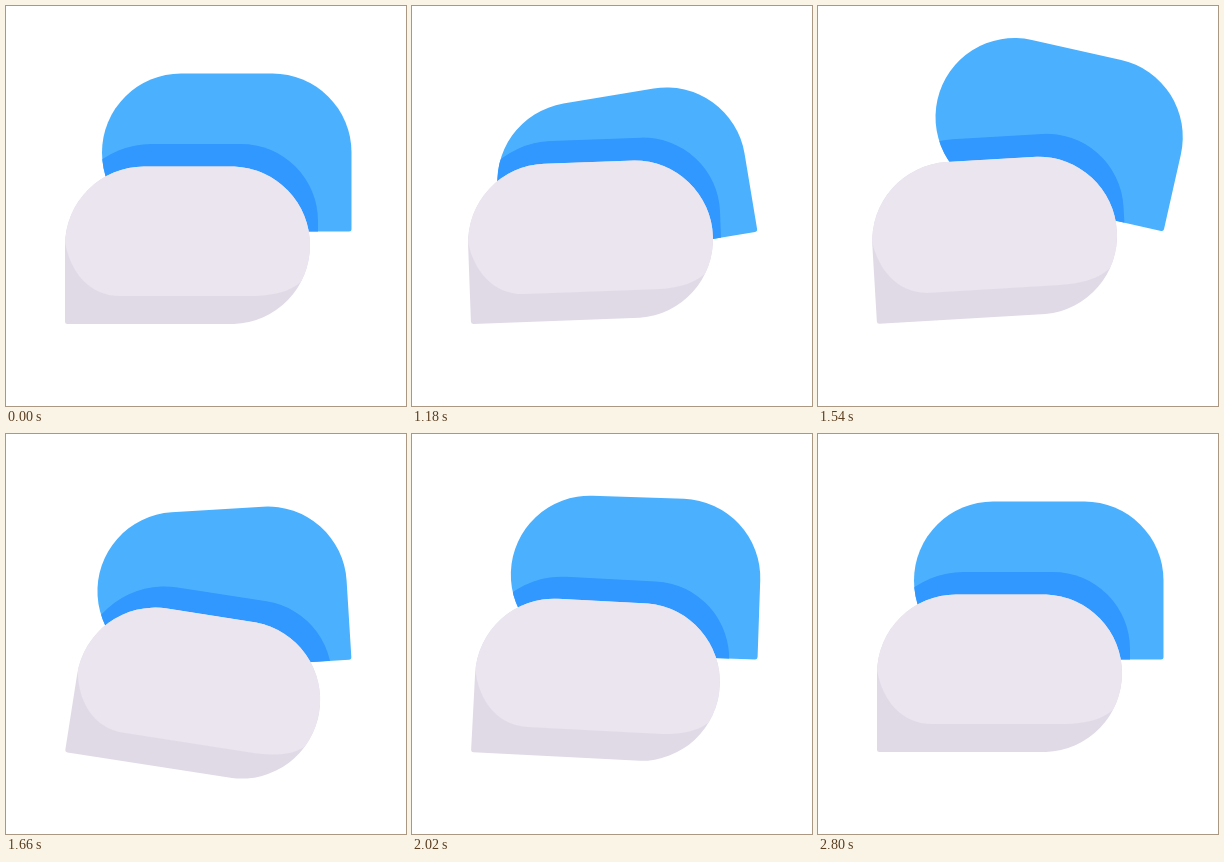
An HTML page that plays this animation: 400 px wide and 400 px high, repeating every 2830 ms.

```html
<!DOCTYPE html>
<html lang="en">
<head>
<meta charset="utf-8">
<title>Chat bubbles</title>
<style>
  html, body { margin: 0; width: 100%; height: 100%; overflow: hidden; background: #fff; }
  svg { display: block; width: 100vw; height: 100vh; }
</style>
</head>
<body>
<svg viewBox="0 0 400 400">
  <defs>
    <path id="backShape" d="M175 67.5H266.5A79 79 0 0 1 345.5 146.5V223Q345.5 225.5 343 225.5H175A79 79 0 0 1 175 67.5Z"/>
    <path id="frontShape" d="M138 160.5H228A78.8 78.8 0 0 1 228 318H61.5Q59 318 59 315.500V239.500A79 79 0 0 1 138 160.5Z"/>
    <clipPath id="backClip"><use href="#backShape"/></clipPath>
    <clipPath id="frontClip"><use href="#frontShape"/></clipPath>
  </defs>
  <g id="back">
    <use href="#backShape" fill="#4bb1fe"/>
    <g clip-path="url(#backClip)">
      <path id="shadow" fill="#3198ff" d="M60 223A85 85 0 0 1 145 138H235A77 77 0 0 1 312 215V300H60Z"/>
    </g>
  </g>
  <g id="front">
    <use href="#frontShape" fill="#e0dae7"/>
    <path clip-path="url(#frontClip)" fill="#ebe5f0" d="M58 228C61 262 81 290 114 290H244C272 290 297 283 304 262L320 240V150H58Z"/>
  </g>
</svg>
<script>
  const LOOP = 2830, START = 1030, STEP = 30;
  const BACK_PIVOT = "345.5 225.5", FRONT_PIVOT = "59 318";

  const ease = {
    in: p => 1 - Math.cos(p * Math.PI / 2),
    out: p => Math.sin(p * Math.PI / 2),
    both: p => (1 - Math.cos(p * Math.PI)) / 2
  };

  // [time in ms, angle in degrees, easing towards this key]
  const backKeys = [
    [1030, -1.6], [1150, -9.8, "out"], [1525, 13, "both"], [1715, -7.5, "both"],
    [1930, 4.6, "both"], [2150, -2.7, "both"], [2370, 1.2, "both"],
    [2590, -0.6, "both"], [2800, 0, "both"]
  ];
  const frontKeys = [
    [1030, 3.6], [1090, 9.8, "out"], [1180, -2.1, "in"], [1450, -13.2, "out"],
    [1645, 9.1, "both"], [1832, -5.4, "both"], [2020, 3, "both"],
    [2209, -1.6, "both"], [2400, 0.9, "both"], [2600, 0, "both"]
  ];

  function angleAt(keys, t) {
    if (t < START) return 0;
    const i = keys.findIndex(k => k[0] > t);
    if (i < 0) return 0;
    const [t0, a0] = keys[i - 1], [t1, a1, kind] = keys[i];
    return a0 + (a1 - a0) * ease[kind]((t - t0) / (t1 - t0));
  }

  const [back, front, shadow] = ["back", "front", "shadow"].map(id => document.getElementById(id));
  const origin = performance.now();

  function draw() {
    let t = (performance.now() - origin) % LOOP;
    if (t >= START) t = START + Math.floor((t - START) / STEP) * STEP;
    const b = angleAt(backKeys, t), f = angleAt(frontKeys, t);
    const turn = `rotate(${f} ${FRONT_PIVOT})`;
    back.setAttribute("transform", `rotate(${b} ${BACK_PIVOT})`);
    front.setAttribute("transform", turn);
    // the shadow follows the front bubble but stays inside the back one
    shadow.setAttribute("transform", `rotate(${-b} ${BACK_PIVOT}) ${turn}`);
    requestAnimationFrame(draw);
  }
  draw();
</script>
</body>
</html>
```
